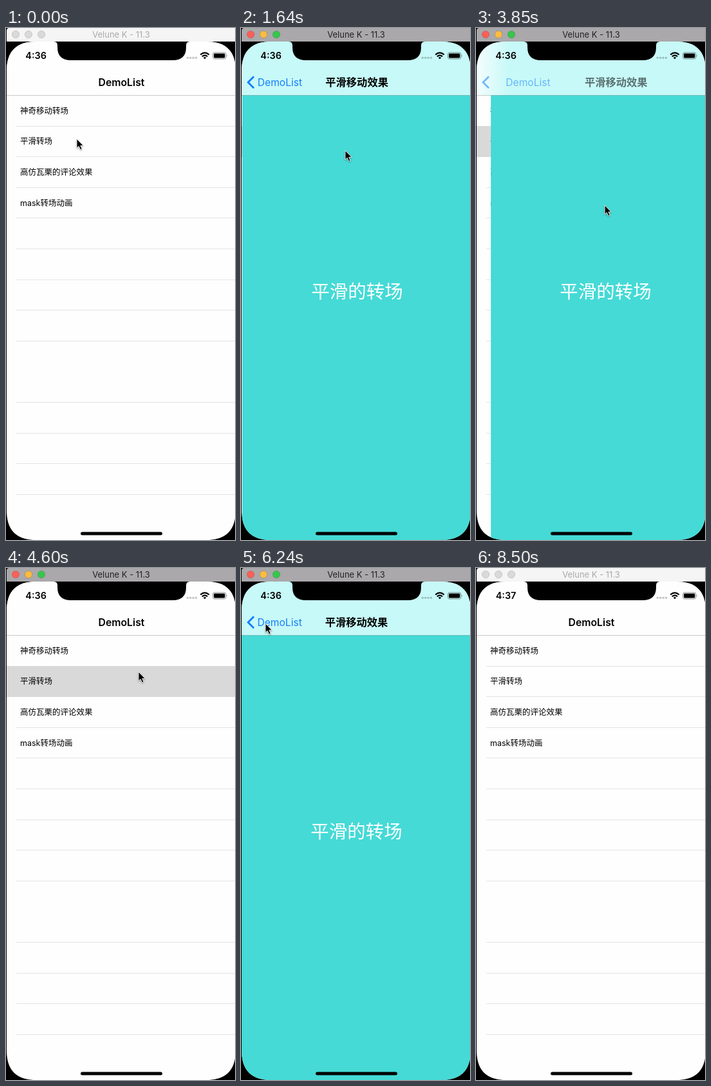
An HTML page that plays this animation: 356x794 px, repeating every 8.6 s.

```html
<!DOCTYPE html>
<html lang="zh-CN">
<head>
<meta charset="utf-8">
<title>DemoList</title>
<style>
  html, body { margin: 0; width: 100%; height: 100%; overflow: hidden; background: #000; }
  svg { display: block; width: 356px; height: 794px; }
  text { font-family: Inter, "Noto Sans CJK SC", "Noto Sans CJK", sans-serif; }
  .mid { text-anchor: middle; }
  .semi { font-weight: 600; }
  .row { font-size: 12.5px; }
  #arrow { filter: drop-shadow(0 1px 1px rgba(0, 0, 0, .4)); }
</style>
</head>
<body>
<svg viewBox="0 0 356 794">
  <defs>
    <clipPath id="screen">
      <path d="M1 67C1 36 16 21 47 21H311C342 21 357 36 357 67V748C357 779 342 794 311 794H47C16 794 1 779 1 748Z"/>
    </clipPath>
    <linearGradient id="tint" gradientUnits="userSpaceOnUse">
      <stop offset="0" stop-color="#fefefe"/>
      <stop offset="1" stop-color="#c7f9f8"/>
    </linearGradient>
  </defs>

  <path id="bar" d="M1 21V4Q1 0 5 0H356V21Z"/>
  <g id="lights"></g>
  <text id="device" class="mid" x="179" y="15" font-size="13">Velune K - 11.3</text>

  <g clip-path="url(#screen)">
    <rect x="1" y="21" width="356" height="773" fill="#fefefe"/>
    <g id="list"></g>
    <rect id="press" x="1" y="152" width="356" height="48" fill="#d9d9d9"/>
    <g id="labels"></g>
    <g id="page">
      <rect x="1" y="104" width="356" height="690" fill="#45dad6"/>
      <text class="mid" x="179.5" y="418.5" font-size="28.5" font-weight="300" fill="#fff">平滑的转场</text>
    </g>
    <rect x="1" y="21" width="356" height="83.5" fill="url(#tint)"/>
    <rect x="1" y="104" width="356" height="1" fill="#000" opacity=".2"/>
    <text id="home" class="mid semi" x="179.5" y="89.7" font-size="15.8">DemoList</text>
    <path id="chevron" d="M20 75.2L11 84.2L20 93.2" fill="none" stroke="#147efb" stroke-width="2.8"/>
    <text id="back" x="25.5" y="89.7" font-size="15.6" fill="#147efb">DemoList</text>
    <text id="title" class="mid semi" x="179.5" y="90" font-size="16.3">平滑移动效果</text>

    <path d="M74 21Q80 21 80 27V30Q80 50 101 50H259Q280 50 280 30V27Q280 21 286 21Z"/>
    <text id="clock" class="mid semi" x="46.6" y="48.2" font-size="14.4"></text>
    <g id="dots" opacity=".22"></g>
    <g fill="none" stroke="#000" stroke-width="2.1">
      <path d="M302.3 41.4Q309 35.4 315.7 41.4"/>
      <path d="M304.8 44.2Q309 40.6 313.2 44.2"/>
    </g>
    <path d="M306.7 45.9Q309 44.1 311.3 45.9L309 48.2Z"/>
    <rect x="321.5" y="38" width="20.5" height="10" rx="2.8" fill="none" stroke="#000" opacity=".42"/>
    <rect x="323" y="39.6" width="17.4" height="6.8" rx="1.4"/>
    <path d="M343 41.3Q344.6 43 343 44.7Z" opacity=".5"/>
    <rect x="116" y="781.5" width="127" height="5" rx="2.5"/>
  </g>

  <path id="arrow" d="M0 0V14.2L3.2 11.3L5.6 16.8L8.1 15.7L5.8 10.4H10.2Z" stroke="#fff" stroke-width=".9"/>
</svg>

<script>
const LOOP = 8600, WIDTH = 356;
const $ = id => document.getElementById(id);
const clamp = v => Math.min(1, Math.max(0, v));
const ease = u => u < .5 ? 2 * u * u : 1 - 2 * (1 - u) ** 2;

function add(parent, tag, attrs, text = '') {
  const el = document.createElementNS('http://www.w3.org/2000/svg', tag);
  for (const k in attrs) el.setAttribute(k, attrs[k]);
  el.textContent = text;
  return $(parent).appendChild(el);
}

const pitch = 47.6;
['神奇移动转场', '平滑转场', '高仿瓦栗的评论效果', 'mask转场动画'].forEach((s, i) =>
  add('labels', 'text', { class: 'row', x: 22, y: 132.8 + i * pitch }, s));
for (let i = 1; i < 14; i++) {
  if (i !== 9) add('list', 'rect', { x: 16, y: Math.floor(104.5 + i * pitch), width: 341, height: 1, fill: '#e4e4e5' });
}
for (let i = 0; i < 4; i++) add('dots', 'circle', { cx: 282.3 + i * 4.4, cy: 46.3, r: 1.8 });
const lights = ['#fc5f58', '#fdbc3f', '#34c84a'].map((color, i) =>
  [add('lights', 'circle', { cx: 15 + i * 20, cy: 10, r: 5.6 }), color]);

// The screen refreshes in bursts: start, end, number of steps
const bursts = [
  [1200, 2230, 8], [2370, 3260, 7], [3710, 4300, 5], [4600, 5200, 5],
  [5490, 6240, 6], [6540, 7290, 6]
];

function snap(t) {
  let out = 0;
  for (const [from, to, n] of bursts) {
    if (t < from) break;
    const step = (to - from) / (n - 1);
    out = from + step * Math.min(n - 1, Math.floor((t - from) / step + .06));
  }
  return out;
}

// Pointer: time, x, y
const path = [
  [0, 110, 172], [1200, 110, 172], [1641, 162, 190], [2230, 100, 138],
  [2815, 5, 290], [3260, 108, 388], [3710, 140, 330], [3857, 200, 275],
  [4005, 230, 222], [4152, 224, 182], [4300, 206, 161], [4600, 206, 161],
  [5200, 120, 176], [5640, 120, 176], [6240, 38, 86], [6540, 38, 86],
  [6690, 62, 170], [6990, 163, 491], [7290, 230, 830]
];

function pointer(t) {
  const i = path.findIndex(k => k[0] > t);
  if (i < 0) return path[path.length - 1].slice(1);
  const [a, x0, y0] = path[i - 1], [b, x1, y1] = path[i];
  const u = (t - a) / (b - a);
  return [x0 + (x1 - x0) * u, y0 + (y1 - y0) * u];
}

// away: how far the page has left; nav: progress of the bar titles
function transition(t, x) {
  const push = start => {
    const left = 1 - ease(clamp((t - start) / 440));
    return { away: left, nav: left };
  };
  if (t < 3710) return push(1218);
  if (t < 4600) {
    const p = clamp((x - 134) / 375);
    return { away: ease(p), nav: p };
  }
  if (t < 6540) return push(5508);
  return { away: ease(clamp((t - 6555) / 500)), nav: ease(clamp((t - 6555) / 420)) };
}

function pressed(t) {
  if (t < 1200) return 0;
  if (t < 5490) return 1 - clamp((t - 4600) / 400);
  return 1 - clamp((t - 6555) / 420);
}

function shift(id, x, y = 0) { $(id).setAttribute('transform', `translate(${x} ${y})`); }
function fade(id, v) { $(id).setAttribute('opacity', clamp(v)); }

function draw(time) {
  const t = snap(time);
  const [x, y] = pointer(t);
  const { away, nav } = transition(t, x);
  const offset = away * WIDTH, gone = away === 1;

  shift('arrow', x, y);
  shift('page', offset);
  const lead = Math.min(35, offset * 1.5);
  $('tint').setAttribute('x1', gone ? 400 : 1 + offset - lead);
  $('tint').setAttribute('x2', gone ? 401 : 1.01 + offset + lead * .86);

  shift('home', -118 * (1 - nav));
  shift('back', 118 * nav);
  shift('title', 217 * nav);
  fade('home', (nav - .4) / .6);
  for (const id of ['back', 'title', 'chevron']) fade(id, 1 - 2.6 * nav);
  fade('press', pressed(t));

  const active = time >= 1200 && time < 8500;
  $('bar').setAttribute('fill', active ? '#aaa8aa' : '#f5f5f5');
  $('device').setAttribute('fill', active ? '#222' : '#a9a9ab');
  for (const [dot, color] of lights) {
    dot.setAttribute('fill', active ? color : '#d9d9d9');
    dot.setAttribute('stroke', active ? 'rgba(0,0,0,.15)' : '#c8c8c8');
  }
  $('clock').textContent = time < 8040 ? '4:36' : '4:37';
}

const begin = performance.now();
function tick() {
  draw((performance.now() - begin) % LOOP);
  requestAnimationFrame(tick);
}
tick();
</script>
</body>
</html>
```
